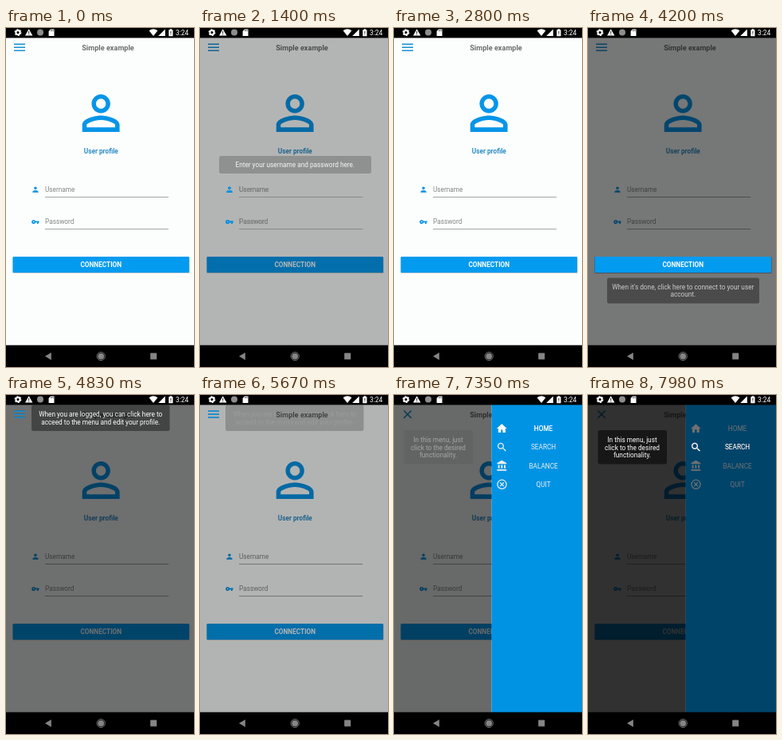
An HTML page for the animation above (8000 ms loop, 236 px wide and 424 px high).

```html
<!DOCTYPE html>
<html lang="en">
<head>
<meta charset="utf-8">
<title>Guided login</title>
<style>
  html, body { margin: 0; width: 100%; height: 100%; overflow: hidden; background: #000; }
  svg { display: block; }
  text { font: 8.25px Roboto, Arial, sans-serif; }
  .b { font-weight: 700; }
  .mid { text-anchor: middle; }
  .blue { fill: #0795e8; }
  .hint { fill: #858585; }
  .rule { stroke: #8c9090; stroke-width: .8; }
  .bars { fill: none; stroke: #1590d6; stroke-width: 1.5; }
  .white, .tip text { fill: #fff; }
  .tip text { text-anchor: middle; }

  .fade, .tip text, .lit, .on { opacity: 0; animation: 8s linear infinite; }
  .tip text { animation-timing-function: cubic-bezier(.1, .7, .4, 1); }
  .lit { animation-timing-function: step-end; }

  .s1 .fade, .s1 text.ink { animation-name: show1; }
  .s2 .fade, .s2 text.ink { animation-name: show2; }
  .s3 .fade, .s3 text.ink { animation-name: show3; }
  .s4 .fade, .s4 text.ink { animation-name: show4; }
  .s1 .lit { animation-name: lit1; }
  .s2 .lit { animation-name: lit2; }
  .s3 .lit { animation-name: lit3; }
  .s4 .lit.home { animation-name: litHome; }
  .s4 .lit.search { animation-name: litSearch; }
  .menu { animation-name: menu; }
  .cross { animation-name: cross; }
  .burger { animation: burger 8s linear infinite; }

  /* 1% = 80 ms */
  @keyframes show1 { 0%, 13.5% { opacity: 0 } 21.2%, 31.3% { opacity: 1 } 34.9%, 100% { opacity: 0 } }
  @keyframes show2 { 0%, 35.2% { opacity: 0 } 40.2%, 52.3% { opacity: 1 } 56%, 100% { opacity: 0 } }
  @keyframes show3 { 0%, 56.3% { opacity: 0 } 60.3%, 68.5% { opacity: 1 } 73.5%, 100% { opacity: 0 } }
  @keyframes show4 { 0%, 91.4% { opacity: 0 } 96.2%, 100% { opacity: 1 } }
  @keyframes lit1 { 0% { opacity: 0 } 13.5% { opacity: 1 } 34.9%, 100% { opacity: 0 } }
  @keyframes lit2 { 0% { opacity: 0 } 35.2% { opacity: 1 } 56%, 100% { opacity: 0 } }
  @keyframes lit3 { 0% { opacity: 0 } 56.3% { opacity: 1 } 73.5%, 100% { opacity: 0 } }
  @keyframes litHome { 0% { opacity: 0 } 91.4% { opacity: 1 } 98.87%, 100% { opacity: 0 } }
  @keyframes litSearch { 0% { opacity: 0 } 98.87%, 100% { opacity: 1 } }
  @keyframes menu { 0%, 78.3% { opacity: 0 } 82.1%, 100% { opacity: 1 } }
  @keyframes cross { 0%, 75.6% { opacity: 0 } 76.9%, 100% { opacity: 1 } }
  @keyframes burger { 0%, 75.6% { opacity: 1 } 76.9%, 100% { opacity: 0 } }
</style>
</head>
<body>
<svg width="236" height="424" viewBox="0 0 236 424">
  <defs>
    <rect id="dim" y="12" width="236" height="385" fill="#000" fill-opacity=".56"/>
    <path id="bars" class="bars" d="M10 20.2h14M10 24.2h14M10 28.2h14"/>

    <g id="fields">
      <path class="blue" transform="translate(31.6 196.7) scale(.45)" d="M12 12c2.21 0 4-1.79 4-4s-1.79-4-4-4-4 1.79-4 4 1.79 4 4 4zm0 2c-2.67 0-8 1.34-8 4v2h16v-2c0-2.66-5.33-4-8-4z"/>
      <text class="hint" x="49" y="205.3">Username</text>
      <path class="rule" d="M49 211.5H204"/>
      <path class="blue" transform="translate(31.7 237.3) scale(.43)" d="M12.65 10C11.83 7.67 9.61 6 7 6c-3.31 0-6 2.69-6 6s2.69 6 6 6c2.61 0 4.83-1.67 5.65-4H17v4h4v-4h2v-4H12.65zM7 14c-1.1 0-2-.9-2-2s.9-2 2-2 2 .9 2 2-.9 2-2 2z"/>
      <text class="hint" x="49" y="245.3">Password</text>
      <path class="rule" d="M49 251.5H204"/>
    </g>

    <g id="button">
      <rect x="8.5" y="286.8" width="222" height="20" rx="1" fill="#000" opacity=".22"/>
      <rect x="8.5" y="286" width="221.5" height="20" rx="1" fill="#039bf0"/>
      <text class="b white mid" x="119.3" y="299.2">CONNECTION</text>
    </g>

    <g id="home" class="white">
      <path transform="translate(127.9 34.5) scale(.62)" d="M10 20v-6h4v6h5v-8h3L12 3 2 12h3v8z"/>
      <text class="mid" x="187.6" y="45">HOME</text>
    </g>
    <g id="search" class="white">
      <path transform="translate(128.1 57.8) scale(.62)" d="M15.5 14h-.79l-.28-.27C15.41 12.59 16 11.11 16 9.5 16 5.91 13.09 3 9.5 3S3 5.91 3 9.5 5.91 16 9.5 16c1.61 0 3.09-.59 4.23-1.57l.27.28v.79l5 4.99L20.49 19l-4.99-5zm-6 0C7.01 14 5 11.99 5 9.5S7.01 5 9.5 5 14 7.01 14 9.5 11.99 14 9.5 14z"/>
      <text class="mid" x="187.6" y="68.2">SEARCH</text>
    </g>
  </defs>

  <!-- Login page -->
  <rect y="12" width="236" height="385" fill="#fcfefe"/>
  <use href="#bars" class="burger"/>
  <path class="bars on cross" d="M12.3 19.5l9.4 9.4M21.7 19.5l-9.4 9.4"/>
  <text class="b mid" x="128" y="27.6" fill="#6c6c6c" style="font-size:9.15px">Simple example</text>
  <path class="blue" transform="translate(84 71.3) scale(2.93)" d="M12 5.9c1.16 0 2.1.94 2.1 2.1s-.94 2.1-2.1 2.1S9.9 9.16 9.9 8s.94-2.1 2.1-2.1m0 9c2.97 0 6.1 1.46 6.1 2.1v1.1H5.9V17c0-.64 3.13-2.1 6.1-2.1M12 4C9.79 4 8 5.79 8 8s1.79 4 4 4 4-1.79 4-4-1.79-4-4-4zm0 9c-2.67 0-8 1.34-8 4v3h16v-3c0-2.66-5.33-4-8-4z"/>
  <text class="b mid" x="119.3" y="156.8" fill="#2a8cc6">User profile</text>
  <use href="#fields"/>
  <use href="#button"/>

  <!-- Side menu -->
  <g class="on menu">
    <rect y="12" width="122.5" height="385" fill="#000" fill-opacity=".56"/>
    <rect x="122.5" y="12" width="113.5" height="385" fill="#009cf2"/>
    <use href="#home"/>
    <use href="#search"/>
    <g class="white">
      <path transform="translate(128.2 81.2) scale(.62)" d="M4 10v7h3v-7H4zm6 0v7h3v-7h-3zM2 22h19v-3H2v3zm14-12v7h3v-7h-3zm-4.5-9L2 6v2h19V6l-9.5-5z"/>
      <text class="mid" x="187.6" y="91.5">BALANCE</text>
      <text class="mid" x="187.6" y="114.8">QUIT</text>
    </g>
    <g fill="none" stroke="#fff" stroke-width="1.25">
      <circle cx="135.5" cy="111.8" r="5.6"/>
      <path d="M133.2 109.5l4.6 4.6M137.8 109.5l-4.6 4.6"/>
    </g>
  </g>

  <!-- Tour steps -->
  <g class="s1">
    <use href="#dim" class="fade"/>
    <use href="#fields" class="lit"/>
    <g class="tip">
      <rect class="fade" x="24" y="160" width="191" height="22" rx="2.5" fill-opacity=".39"/>
      <text class="ink" x="119.3" y="174">Enter your username and password here.</text>
    </g>
  </g>
  <g class="s2">
    <use href="#dim" class="fade"/>
    <use href="#button" class="lit"/>
    <g class="tip">
      <rect class="fade" x="24" y="312.5" width="191" height="32" rx="2.5" fill-opacity=".39"/>
      <text class="ink" x="119.3" y="326.8">When it's done, click here to connect to your user<tspan x="119.3" dy="9.6">account.</tspan></text>
    </g>
  </g>
  <g class="s3">
    <use href="#dim" class="fade"/>
    <use href="#bars" class="lit"/>
    <g class="tip">
      <rect class="fade" x="32" y="12.5" width="173.5" height="32.5" rx="2.5" fill-opacity=".39"/>
      <text class="ink" x="118.7" y="27">When you are logged, you can click here to<tspan x="118.7" dy="9.6">acceed to the menu and edit your profile.</tspan></text>
    </g>
  </g>
  <g class="s4">
    <use href="#dim" class="fade"/>
    <use href="#home" class="lit home"/>
    <use href="#search" class="lit search"/>
    <g class="tip">
      <rect class="fade" x="12.5" y="44" width="86.5" height="42.5" rx="2.5" fill-opacity=".52"/>
      <text class="ink" x="55.5" y="59">In this menu, just<tspan x="55.5" dy="9.6">click to the desired</tspan><tspan x="55.5" dy="9.6">functionality.</tspan></text>
    </g>
  </g>

  <!-- Status bar -->
  <rect width="236" height="12.4"/>
  <g class="white">
    <circle cx="15" cy="5.6" r="2.6" fill="none" stroke="#fff" stroke-width="2"/>
    <circle cx="15" cy="5.6" r="3.9" fill="none" stroke="#fff" stroke-width="1.1" stroke-dasharray="2.04"/>
    <path d="M28.7 1.2l4.7 8.4h-9.4z"/>
    <path d="M28.7 4v2.8M28.7 7.5v1" stroke="#000" stroke-width=".9"/>
    <circle cx="43" cy="5.6" r="4" fill="#8d8d8d"/>
    <path d="M53.6 4l2.4-2.6h4.5v8.6h-6.9z"/>
    <path d="M56.4 2.4v1.7M57.8 2.4v1.7M59.2 2.4v1.7" stroke="#000" stroke-width=".6"/>
    <path d="M179.6 3.2q5.4-3.8 10.8 0L185 10z"/>
    <path d="M199.8 1.4v8.6h-8.6z"/>
    <path d="M204.3 2.3h1.4v-1h2.4v1h1.4v8h-5.2z"/>
    <path d="M206.9 4v2.9M206.9 7.6v1" stroke="#000" stroke-width=".8"/>
    <text x="213" y="8.7" style="font-size:8.4px">3:24</text>
  </g>

  <!-- Navigation bar -->
  <rect y="396.7" width="236" height="27.3"/>
  <g fill="#858585">
    <path d="M49 410.6l7.8-4.6v9.2z"/>
    <circle cx="119.2" cy="410.6" r="3.9"/>
    <circle cx="119.2" cy="410.6" r="5.1" fill="none" stroke="#858585" stroke-width=".9"/>
    <rect x="181.2" y="406.6" width="8" height="8" rx=".6"/>
  </g>
</svg>
</body>
</html>
```
